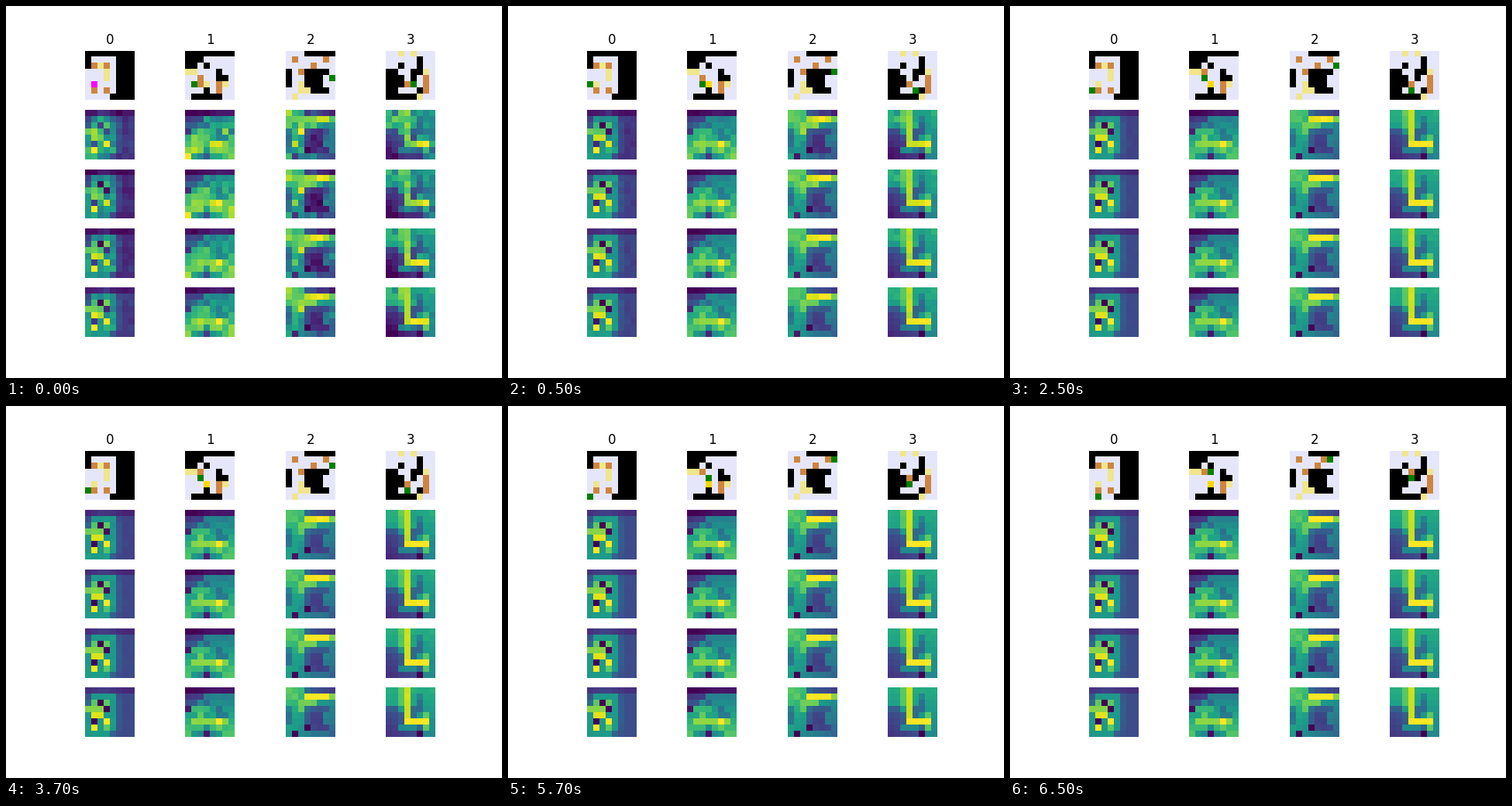
Recreate the animation shown at these times as a matplotlib script. Size 640 by 480 pixels, loop 8000 ms.

```python
import numpy as np
import matplotlib.pyplot as plt
from matplotlib.animation import FuncAnimation
from matplotlib.colors import to_rgb

SIZE, STEPS, MAPS = 8, 5, 4
FRAMES, INTERVAL = 16, 500

FLOOR, WALL, GOAL, BOX = "lavender", "black", "khaki", "peru"
AGENT, AGENT_ON_GOAL, BOX_ON_GOAL = "green", "magenta", "gold"
MOVES = {"L": (-1, 0), "R": (1, 0), "U": (0, -1), "D": (0, 1)}

# Walls are (x, y, width, height); goals, boxes and cold cells are (x, y).
# Warm strokes add a final value; tilt is the slope of the values in x and y.
MAZES = [
    dict(walls=[(0, 0, 8, 1), (0, 1, 1, 2), (5, 1, 3, 6), (4, 7, 4, 1)],
         goals=[(2, 2), (3, 3), (3, 4), (1, 5)],
         boxes=[(1, 2), (3, 2), (1, 6), (3, 6)], start=(1, 5), path="LDDR",
         tilt=(0, 0), cold=[(2, 2), (3, 3), (1, 5)],
         warm=[(0, 3, 3, 1, .82), (1, 4, 2, 1, .96), (3, 5, 1, 1, 1),
               (1, 6, 1, 1, 1)]),
    dict(walls=[(0, 0, 8, 1), (0, 1, 3, 1), (0, 2, 2, 1), (3, 2, 1, 1),
                (5, 3, 1, 2), (6, 4, 1, 1), (3, 6, 1, 1), (1, 7, 5, 1)],
         goals=[(0, 3), (1, 3), (3, 5), (6, 5)],
         boxes=[(2, 4), (2, 5), (5, 5), (5, 6)], start=(1, 5), path="RURU",
         tilt=(0, .35), cold=[(0, 3), (3, 7)],
         warm=[(1, 3, 3, 1, .65), (1, 5, 6, 1, .82), (5, 5, 1, 1, 1)]),
    dict(walls=[(3, 0, 5, 1), (0, 3, 1, 3), (3, 3, 4, 1), (3, 4, 3, 2),
                (4, 6, 3, 1)],
         goals=[(2, 5), (2, 6), (3, 6), (1, 7)],
         boxes=[(1, 1), (6, 1), (4, 2), (2, 3)], start=(7, 4), path="UUUL",
         tilt=(-.2, -.2), cold=[(3, 6), (1, 7)],
         warm=[(2, 2, 3, 1, .78), (3, 1, 5, 1, .82), (3, 1, 4, 1, 1)]),
    dict(walls=[(5, 1, 1, 3), (4, 3, 1, 2), (2, 2, 1, 1), (0, 3, 2, 1),
                (0, 4, 3, 2), (0, 6, 2, 1), (5, 6, 1, 1), (0, 7, 5, 1)],
         goals=[(2, 0), (4, 0), (6, 3), (5, 7)],
         boxes=[(3, 5), (6, 4), (6, 5), (6, 6)], start=(4, 5), path="DLUU",
         tilt=(0, -.15), cold=[(5, 7)],
         warm=[(2, 0, 1, 3, .74), (3, 0, 1, 5, .92), (3, 5, 4, 1, 1)]),
]


def wall_mask(maze):
    mask = np.zeros((SIZE, SIZE), bool)
    for x, y, w, h in maze["walls"]:
        mask[y:y + h, x:x + w] = True
    return mask


def draw_maze(maze, boxes, agent):
    grid = np.empty((SIZE, SIZE, 3))
    grid[:] = to_rgb(FLOOR)
    grid[wall_mask(maze)] = to_rgb(WALL)
    for x, y in maze["goals"]:
        grid[y, x] = to_rgb(GOAL)
    for x, y in boxes:
        grid[y, x] = to_rgb(BOX_ON_GOAL if (x, y) in maze["goals"] else BOX)
    color = AGENT_ON_GOAL if agent in maze["goals"] else AGENT
    grid[agent[1], agent[0]] = to_rgb(color)
    return grid


def play(maze):
    """Return one picture per step; walking into a box pushes it."""
    agent, boxes = maze["start"], set(maze["boxes"])
    pictures = [draw_maze(maze, boxes, agent)]
    for move in maze["path"]:
        dx, dy = MOVES[move]
        agent = agent[0] + dx, agent[1] + dy
        if agent in boxes:
            boxes.remove(agent)
            boxes.add((agent[0] + dx, agent[1] + dy))
        pictures.append(draw_maze(maze, boxes, agent))
    return pictures


def base_values(maze):
    """Floor is medium on a slope; walls are darker the denser they stand."""
    y, x = (np.mgrid[:SIZE, :SIZE] - 3.5) / 7
    walls = wall_mask(maze)
    padded = np.pad(walls.astype(float), 1, mode="edge")
    density = sum(padded[i:i + SIZE, j:j + SIZE]
                  for i in range(3) for j in range(3)) / 9
    slope_x, slope_y = maze["tilt"]
    grid = .54 + slope_x * x + slope_y * y - .3 * walls * np.sqrt(density)
    grid[0] -= .1 * walls[0]
    return grid


def final_values(maze):
    grid = base_values(maze)
    for x, y in maze["boxes"]:
        grid[y, x] = .75
    for x, y, w, h, value in maze["warm"]:
        grid[y:y + h, x:x + w] = value
    for x, y in maze["cold"]:
        grid[y, x] = 0
    return grid


def settle(maze, seed):
    """Return the value maps, whose contrast grows while their noise fades."""
    rng = np.random.default_rng(seed)
    base, final = base_values(maze), final_values(maze)
    spread = np.where(wall_mask(maze), .03, .08)
    noise = rng.normal(size=base.shape)
    maps = []
    for k in range(STEPS * MAPS):
        rest = np.exp(-k / 5)
        noise = .8 * noise + .6 * rng.normal(size=base.shape)
        grid = final + .5 * rest * (base - final) + spread * rest * noise
        maps.append((grid - grid.min()) / np.ptp(grid))
    return maps


games = [play(maze) for maze in MAZES]
value_maps = [settle(maze, seed) for seed, maze in enumerate(MAZES)]

fig, axes = plt.subplots(1 + MAPS, len(MAZES), figsize=(6.4, 4.8), dpi=100)
for ax in axes.flat:
    ax.axis("off")
images = []
for col, game in enumerate(games):
    axes[0, col].set_title(str(col))
    images.append([axes[0, col].imshow(game[0])])
    for row in range(MAPS):
        images[col].append(axes[row + 1, col].imshow(
            value_maps[col][row], cmap="viridis", vmin=0, vmax=1))


def update(frame):
    step = (frame + 3) // 4
    for col, (maze_image, *map_images) in enumerate(images):
        maze_image.set_data(games[col][step])
        for row, image in enumerate(map_images):
            image.set_data(value_maps[col][step * MAPS + row])
    return [image for column in images for image in column]


anim = FuncAnimation(fig, update, frames=FRAMES, interval=INTERVAL,
                     repeat=True, repeat_delay=0)
plt.show()
```
